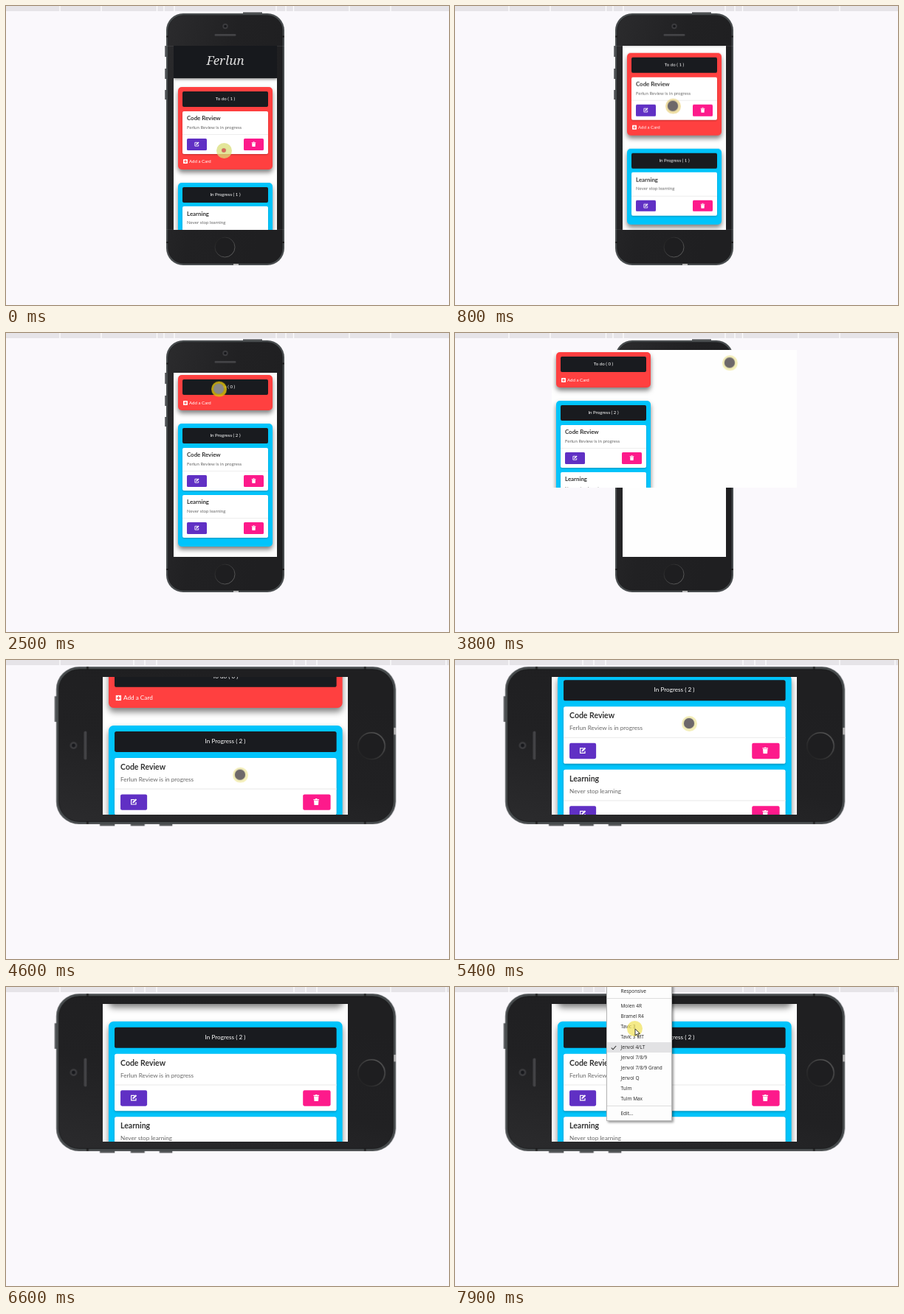
An HTML page for the animation above (8000 ms loop, 600x406 px).

```html
<!DOCTYPE html>
<html lang="en">
<head>
<meta charset="utf-8">
<title>Task board on a phone</title>
<style>
html, body { margin: 0; width: 100%; height: 100%; overflow: hidden; background: #faf8fc; }
.stage { position: relative; width: 600px; height: 406px; overflow: hidden; font-family: Lato, sans-serif; }
.stage * { box-sizing: border-box; }
.scene { position: absolute; left: 0; top: 0; }

/* One 8 s clock; "cut" marks hard changes */
.anim { animation: 8s linear infinite; }
.cut { animation: 8s step-end infinite; }

.phone { animation-name: turn; }
@keyframes turn {
  0% { transform: none; }
  48.75%, 100% { transform: translate(298px, 116px) rotate(-90deg) scale(1.336, 1.345) translate(-297px, -181px); }
}
.portrait { animation-name: portrait; }
.landscape { animation-name: landscape; }
@keyframes portrait { 0% { opacity: 1; } 48.75%, 100% { opacity: 0; } }
@keyframes landscape { 0% { opacity: 0; } 48.75%, 100% { opacity: 1; } }

.screen { position: absolute; overflow: hidden; background: #fefefe; animation-name: screen; }
@keyframes screen {
  0% { left: 227px; top: 54px; width: 140px; height: 250px; }
  47.5%, 100% { left: 131px; top: 23px; width: 332px; height: 187px; }
}
.page { position: absolute; left: 0; top: 0; transform-origin: 0 0; animation-name: page; }
@keyframes page {
  0% { width: 140px; transform: none; }
  48.75%, 100% { width: 248.5px; transform: scale(1.336); }
}
.scroll { position: relative; height: 330px; animation-name: scroll; }
@keyframes scroll {
  0%, 1.25% { transform: translateY(0); }
  8.75%, 26.25% { transform: translateY(-46.3px); }
  30%, 53.75% { transform: translateY(-53px); }
  67.5%, 71.25% { transform: translateY(-124.8px); }
  78.75%, 100% { transform: translateY(-104.2px); }
}

.bar { height: 44px; margin-bottom: 12px; background: #17191d; box-shadow: 0 1px 4px rgba(0,0,0,.6);
  color: #dedede; font: italic 17px/40px "Noto Serif", serif; text-align: center; }
.col { position: relative; margin: 0 6px 18.3px; border-radius: 5px; box-shadow: 0 4px 6px rgba(0,0,0,.5); }
.todo { background: #ff4040; animation-name: todo; }
.prog { background: #00c4fb; animation-name: prog; }
@keyframes todo { 0% { height: 111.6px; } 23.75%, 100% { height: 48px; } }
@keyframes prog {
  0%, 16.25% { height: 103px; }
  18%, 23.74% { height: 174px; }
  23.75%, 100% { height: 167px; }
}
.head { position: absolute; left: 6px; right: 6px; top: 6.2px; height: 20.8px; border-radius: 2px;
  background: #191b1f; color: #fff; font-size: 6.125px; line-height: 20.8px; text-align: center; }
.head span { position: absolute; inset: 0; }
.before { animation-name: before; }
.after { animation-name: after; }
@keyframes before { 0% { opacity: 1; } 23.75%, 100% { opacity: 0; } }
@keyframes after { 0% { opacity: 0; } 23.75%, 100% { opacity: 1; } }
.add { position: absolute; left: 15px; bottom: 6.5px; color: #fff; font-size: 6.125px; line-height: 8px; }
.add svg { position: absolute; left: -8px; top: 1px; }

.card { position: absolute; left: 6px; right: 6px; height: 58.5px; border-radius: 2px; background: #fff;
  box-shadow: 0 1px 2px rgba(0,0,0,.25); }
.card h2 { position: absolute; left: 6px; top: 4.7px; margin: 0; font-size: 7.875px; line-height: 10px; color: #333; white-space: nowrap; }
.card p { position: absolute; left: 6px; top: 18px; margin: 0; font-size: 6.125px; line-height: 8px; color: #686868; white-space: nowrap; }
.card hr { position: absolute; left: 0; right: 0; top: 31.6px; margin: 0; border: 0; border-top: .6px solid #eee; }
.btn { position: absolute; top: 37.6px; width: 27.4px; height: 15.4px; border-radius: 1.6px; }
.btn svg { position: absolute; left: 10.2px; top: 4.2px; }
.edit { left: 6px; background: #6030c4; }
.del { right: 6px; background: #fd1a8b; }
.learn { animation-name: learn; }
@keyframes learn {
  0%, 16.25% { top: 32.5px; }
  18%, 23.74% { top: 102px; }
  23.75%, 100% { top: 96.3px; }
}
.review { left: 12px; right: 12px; animation-name: review; }
@keyframes review {
  0%, 12.5% { top: 88.7px; transform: none; }
  15% { top: 90px; transform: translateX(-.5px); }
  18.75% { top: 208.3px; transform: translateX(-.5px); }
  21.9% { top: 212px; transform: translateX(-.5px); }
  23.74% { top: 218.5px; transform: none; }
  23.75%, 100% { top: 154.7px; transform: none; }
}

.menu { position: absolute; left: 205px; top: -8px; width: 89px; height: 190px; background: #fdfdfd;
  border: 1px solid #b5b5b5; box-shadow: 2px 2px 3px rgba(0,0,0,.4); color: #222;
  font: 6.5px/14px "Open Sans", sans-serif; animation-name: menu; }
.menu div { height: 14px; padding-left: 18.5px; white-space: nowrap; }
.menu div:first-child { margin-top: 6px; }
.menu .rule { height: 1px; margin: 2px 0 3px; padding: 0; background: #ddd; }
.menu .on { position: relative; background: #e2e2e4; }
.menu .on svg { position: absolute; left: 5px; top: 3.5px; }
@keyframes menu { 0% { opacity: 0; } 87.5%, 100% { opacity: 1; } }

.cursor { position: absolute; left: 0; top: 0; animation-name: cursor; }
@keyframes cursor {
  0%, 1.25% { transform: translate(295px, 196px); }
  8.75% { transform: translate(295px, 150px); }
  12% { transform: translate(295px, 113px); }
  15% { transform: translate(295px, 114px); }
  18.75% { transform: translate(296px, 232px); }
  22.5% { transform: translate(296px, 237px); }
  26.25% { transform: translate(289px, 83px); }
  31.25% { transform: translate(288px, 76px); }
  33.75% { transform: translate(312px, 24px); }
  38.75%, 47.49% { transform: translate(369px, -2px); }
  47.5% { transform: translate(372px, 40px); }
  53.75% { transform: translate(317px, 182px); }
  67.5%, 71.25% { transform: translate(317px, 86px); }
  78.75% { transform: translate(317px, 114px); }
  81.25% { transform: translate(300px, 60px); }
  87.5% { transform: translate(250px, 4px); }
  98.75%, 100% { transform: translate(243px, 56px); }
}
.show { animation-name: show; }
@keyframes show {
  0% { opacity: 1; }
  40% { opacity: 0; }
  47.5% { opacity: 1; }
  81.25% { opacity: 0; }
  87.5%, 100% { opacity: 1; }
}
.halo, .dot { position: absolute; border-radius: 50%; }
.halo { left: -10.5px; top: -10.5px; width: 21px; height: 21px; animation-name: halo; }
@keyframes halo {
  0%, 2.5% { background: rgba(218,222,120,.75); }
  15%, 22% { background: rgba(244,196,120,.6); }
  30%, 33% { background: rgba(222,190,10,.85); }
  47.5%, 81% { background: rgba(240,232,150,.65); }
  87.5%, 100% { background: rgba(240,226,90,.72); }
}
.dot { left: -7px; top: -7px; width: 14px; height: 14px; box-shadow: 0 0 2px rgba(110,105,105,.6); animation-name: dot; }
@keyframes dot {
  0%, 1.25% { background: #d9695c; transform: scale(.4); }
  4% { background: #6d686a; transform: none; }
  25% { background: #6d686a; }
  30%, 33% { background: #8a8888; }
  47.5%, 100% { background: #6d686a; transform: none; }
}
.touch { animation-name: touch; }
.arrow { position: absolute; left: 0; top: 0; animation-name: arrow; }
@keyframes touch { 0% { opacity: 1; } 32.5% { opacity: 0; } 47.5% { opacity: 1; } 81.25%, 100% { opacity: 0; } }
@keyframes arrow { 0% { opacity: 0; } 32.5% { opacity: 1; } 47.5% { opacity: 0; } 81.25%, 100% { opacity: 1; } }
</style>
</head>
<body>
<div class="stage">
  <svg class="scene" width="600" height="406" viewBox="0 0 600 406">
    <defs>
      <linearGradient id="body" x2="1" y2=".5">
        <stop offset="0" stop-color="#2b2b2d"/><stop offset=".5" stop-color="#212123"/><stop offset="1" stop-color="#1f1f21"/>
      </linearGradient>
      <linearGradient id="ring" x2="1" y2="1">
        <stop offset="0" stop-color="#1a1a1b"/><stop offset="1" stop-color="#666"/>
      </linearGradient>
      <symbol id="pen" viewBox="0 0 16 16">
        <path d="M10 3H2v11h11V9" fill="none" stroke="#fff" stroke-width="2"/>
        <path d="M5 11l.6-3L12.5 1 15 3.500 8 10.500z" fill="#fff"/>
      </symbol>
      <symbol id="bin" viewBox="0 0 16 16">
        <path d="M1.500 2h4l1-1.500h3l1 1.500h4v2h-13zM2.500 5h11l-.8 11H3.300z" fill="#fff"/>
      </symbol>
      <symbol id="plus" viewBox="0 0 16 16">
        <rect width="16" height="16" rx="2" fill="#fff"/><path d="M8 3v10M3 8h10" stroke="#ff4040" stroke-width="2.600"/>
      </symbol>
    </defs>
    <rect width="600" height="7" fill="#e6e4e8"/>
    <path class="cut portrait" d="M73 0v7M129 0v7M204.500 0v7M214 0v7M228 0v7M366 0v7M379 0v7M389.500 0v7M465 0v7M521 0v7" stroke="#fdfcfe" stroke-width="1.300"/>
    <path class="cut landscape" d="M73 0v7M173 0v7M188 0v7M204 0v7M390 0v7M406 0v7M421 0v7M521 0v7M596 0v7" stroke="#fdfcfe" stroke-width="1.300"/>
    <g class="phone cut">
      <path d="M216.500 54v15M216.500 85v14M216.500 114v13" stroke="#55585a" stroke-width="2.600"/>
      <path d="M321 9.700h26" stroke="#55585a" stroke-width="2.600"/>
      <rect x="217" y="10" width="160" height="342" rx="23" fill="#484c4e"/>
      <path d="M217 41.500h4M373 41.500h4M217 321h4M373 321h4" stroke="#222" stroke-width="2"/>
      <path d="M308 351h7" stroke="#bbb" stroke-width="2"/>
      <rect x="219.700" y="12.700" width="154.600" height="336.600" rx="20.500" fill="url(#body)" stroke="#151516" stroke-width=".6"/>
      <circle cx="297" cy="27.500" r="3.700" fill="#3b3b3e"/><circle cx="297" cy="27.500" r="1.800" fill="#17181c"/>
      <rect x="282.500" y="38" width="29" height="2.800" rx="1.400" fill="#434346"/>
      <circle cx="296.500" cy="327.500" r="13.500" fill="#1e1e20" stroke="url(#ring)" stroke-width="1"/>
    </g>
    <rect class="cut portrait" x="227" y="54" width="140" height="250" fill="#fefefe"/>
  </svg>

  <div class="screen cut"><div class="page cut"><div class="scroll anim">
    <div class="bar">Ferlun</div>
    <div class="col todo cut">
      <div class="head"><span class="before cut">To do ( 1 )</span><span class="after cut">To do ( 0 )</span></div>
      <div class="add"><svg width="6" height="6"><use href="#plus"/></svg>Add a Card</div>
    </div>
    <div class="col prog anim">
      <div class="head"><span class="before cut">In Progress ( 1 )</span><span class="after cut">In Progress ( 2 )</span></div>
      <div class="card learn anim">
        <h2>Learning</h2><p>Never stop learning</p><hr>
        <div class="btn edit"><svg width="7" height="7"><use href="#pen"/></svg></div>
        <div class="btn del"><svg width="7" height="7"><use href="#bin"/></svg></div>
      </div>
    </div>
    <div class="card review anim">
      <h2>Code Review</h2><p>Ferlun Review is in progress</p><hr>
      <div class="btn edit"><svg width="7" height="7"><use href="#pen"/></svg></div>
      <div class="btn del"><svg width="7" height="7"><use href="#bin"/></svg></div>
    </div>
  </div></div></div>

  <div class="menu cut">
    <div>Responsive</div>
    <div class="rule"></div>
    <div>Molen 4R</div>
    <div>Bramel R4</div>
    <div>Tavic 3</div>
    <div>Tavic 3 MT</div>
    <div class="on"><svg width="8" height="7" viewBox="0 0 8 7"><path d="M.8 3.600L3 5.800 7.200 1" fill="none" stroke="#333" stroke-width="1.100"/></svg>Jenvol 4/LT</div>
    <div>Jenvol 7/8/9</div>
    <div>Jenvol 7/8/9 Grand</div>
    <div>Jenvol Q</div>
    <div>Tulm</div>
    <div>Tulm Max</div>
    <div class="rule"></div>
    <div>Edit...</div>
  </div>

  <div class="cursor anim"><div class="show cut">
    <div class="halo anim"></div>
    <div class="touch cut"><div class="dot anim"></div></div>
    <svg class="arrow cut" width="9" height="13" viewBox="0 0 9 13"><path d="M1 .8v9l2.100-1.900 1.500 3.300 1.500-.7-1.500-3.200h2.800z" fill="#fff" stroke="#222" stroke-width=".9"/></svg>
  </div></div>
</div>
</body>
</html>
```
